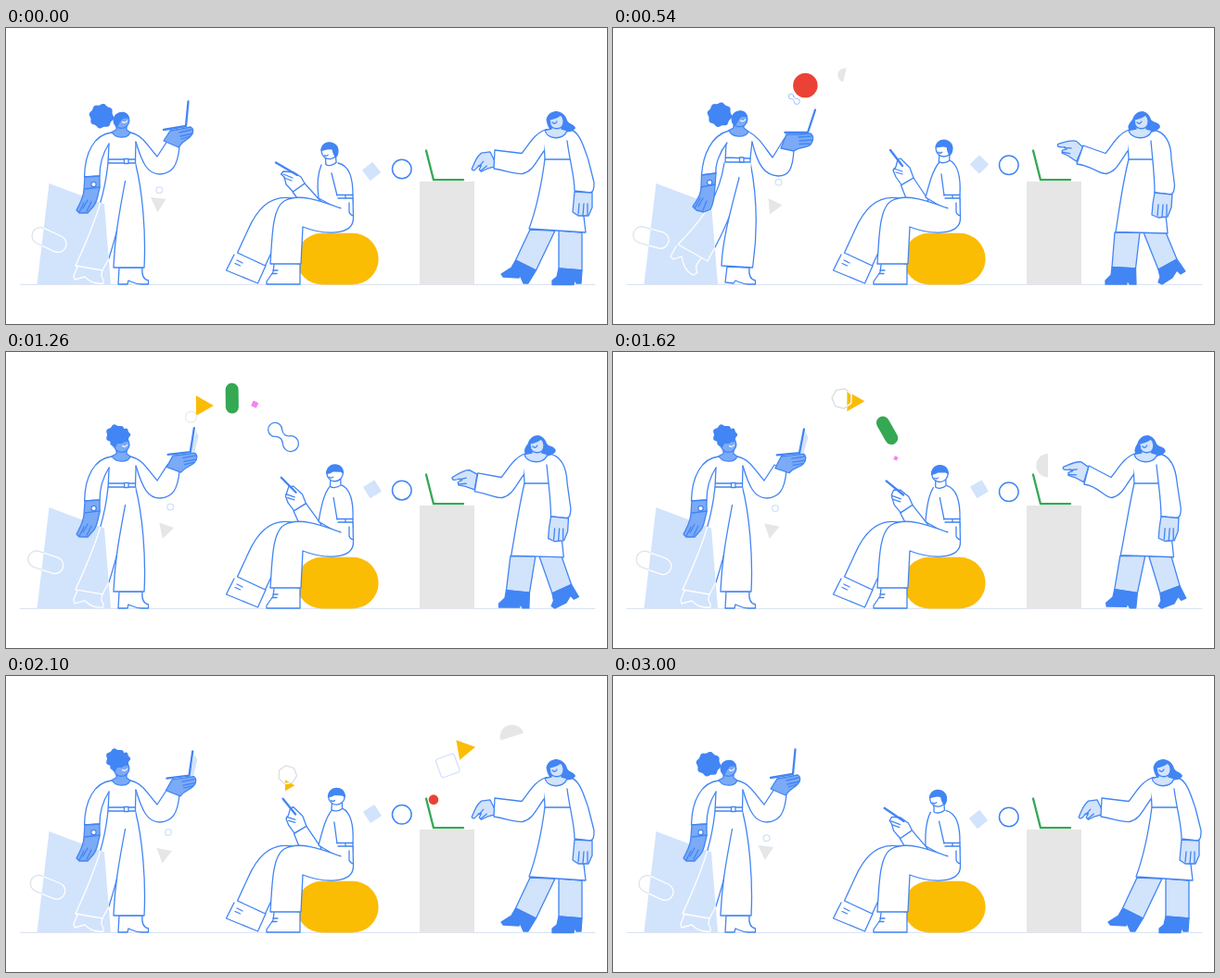
These frames come from a looping animation (648x320 px, 3.06 s). An HTML page:

```html
<!DOCTYPE html>
<html lang="en">
<head>
<meta charset="utf-8">
<title>People sharing shapes</title>
<style>
html, body { margin: 0; width: 100%; height: 100%; overflow: hidden; background: #fff; }
svg { display: block; }
</style>
</head>
<body>
<svg id="stage" width="648" height="320" viewBox="0 0 648 320" stroke-width="1.3" stroke-linejoin="round" stroke-linecap="round" fill="none"></svg>
<script>
const LOOP = 3060;
const BLUE = '#4285f4', SKIN = '#7baaf7', PALE = '#d2e3fc', GRAY = '#e6e6e6';
const RED = '#ea4335', GREEN = '#34a853', YELLOW = '#fbbc04', PINK = '#f583f5';
const line = { stroke: BLUE };
const cloth = { stroke: BLUE, fill: '#fff' };
const skin = { stroke: BLUE, fill: SKIN };
const pale = { stroke: BLUE, fill: PALE };
const ink = { fill: BLUE };
const bold = { stroke: BLUE, 'stroke-width': 2.3 };
const white = { stroke: '#fff' };

const stage = document.getElementById('stage');
function add(tag, attrs, parent = stage) {
  const node = document.createElementNS('http://www.w3.org/2000/svg', tag);
  for (const name in attrs) node.setAttribute(name, attrs[name]);
  parent.appendChild(node);
  return node;
}
const path = (style, d, parent) => add('path', { ...style, d }, parent);
const lerp = (a, b, k) => a + (b - a) * k;
const place = (node, x, y, angle = 0, scale = 1) =>
  node.setAttribute('transform', `translate(${x} ${y}) rotate(${angle}) scale(${scale})`);

// Blend two paths that have the same commands.
const NUMBER = /-?\d+(\.\d+)?/g;
function blend(a, b, k) {
  const ends = b.match(NUMBER);
  let i = 0;
  return a.replace(NUMBER, n => lerp(+n, +ends[i++], k).toFixed(2));
}
const parts = [];
function posed(pose, style, a, b, parent) {
  const node = path(style, a, parent);
  parts.push({ node, pose, a, b });
  return node;
}

// Eased value through the key times, closing the loop on the first one.
const TIMES = [0, 540, 900, 1620, 2100, 2580, 3000, LOOP];
function track(t, ...values) {
  values.push(values[0]);
  let i = 0;
  while (t >= TIMES[i + 1]) i++;
  const x = (t - TIMES[i]) / (TIMES[i + 1] - TIMES[i]);
  return lerp(values[i], values[i + 1], x * x * (3 - 2 * x));
}

function ring(radius, bumps, depth) {
  let d = '';
  for (let i = 0; i < 72; i++) {
    const a = i * Math.PI / 36, r = radius + depth * Math.cos(a * bumps);
    d += `${i ? 'L' : 'M'}${(r * Math.cos(a)).toFixed(2)},${(r * Math.sin(a)).toFixed(2)}`;
  }
  return d + 'Z';
}
function polygon(n, r) {
  return 'M' + Array.from({ length: n }, (_, i) =>
    [r * Math.cos(i * 2 * Math.PI / n), r * Math.sin(i * 2 * Math.PI / n)].map(v => v.toFixed(2))).join('L') + 'Z';
}

// Scenery
const defs = add('defs');
const BOARD = 'M46.5,168 L106,190.5 L113,277 L33.5,277Z';
path({}, BOARD, add('clipPath', { id: 'board' }, defs));
path({ stroke: '#d5dff0', 'stroke-width': 1 }, 'M15,277.3H635');
add('rect', { x: 313, y: 221.8, width: 88.6, height: 55.6, rx: 27.8, fill: YELLOW });
add('rect', { x: 446, y: 166, width: 59, height: 111.5, fill: GRAY });
const hoop = add('circle', { r: 10.3, ...line, 'stroke-width': 1.5 });
path({ stroke: GREEN, 'stroke-width': 2.3 }, 'M453,132.5L461,164.2H493');
const diamond = add('rect', { x: -7.3, y: -7.3, width: 14.6, height: 14.6, rx: 1, fill: PALE });
const wedge = path({ fill: GRAY }, 'M-6,-8.5L9,-1L-4.5,9Z');
const bead = add('circle', { r: 3.4, stroke: PALE });

// Left person
const backLeg = ['M110,146 C107,175 101,200 75,257 L104,262 L111,249 C121,217 128,190 129,163',
  'M120,146 C115,178 103,200 70,234 L102,252 L110,237 C127,205 133,185 137,158'];
const backBoot = ['M77,258 L73,268 L74,272 L85,269 C92,276 98,277 105,276 L105,272 C102,269 103,266 104,262',
  'M68,236 L62,247 L65,250 L74,247 C76,258 80,265 87,267 L91,264 C88,258 90,255 95,249'];
const pillSize = { x: -19.5, y: -9, width: 39, height: 18, rx: 9 };
const pills = [add('rect', { ...pillSize, stroke: '#dde3ec' })];
posed('left', line, ...backLeg);
path({ fill: PALE }, BOARD);
const onBoard = add('g', { 'clip-path': 'url(#board)' });
pills.push(add('rect', { ...pillSize, ...white }, onBoard));
posed('left', white, ...backLeg, onBoard);
posed('left', white, ...backBoot, onBoard);
posed('left', cloth, 'M122,259 L121,277 L131,277 L132,273 C137,275 140,277 146,277 L153.5,277 L153.5,273 C149,272 146,268 147,259Z',
  'M123,258 L121,275 L130,276 L132,273 C137,275 140,277 146,277 L153.5,277 L153.5,273 C149,272 146,268 147,259Z');
posed('left', cloth, 'M129,163 C121,205 117,230 116,259 L149,259 C151,220 147,175 139.5,146',
  'M137,158 C126,200 118,230 117,257 L150.5,259 C157,215 154,175 148,145');
posed('left', { fill: '#fff' }, 'M114,112 L134,112 L140,124 L139,164 L128,165 L110.5,147 L111,124Z',
  'M125,111 L146,112 L150,124 L148,160 L137,162 L121,147 L122,124Z');
posed('left', line, 'M111,125 L110,146 L139.5,146 L139.5,142 L110.5,142', 'M122,124 L121,145 L148,145 L148,141 L121,140');
posed('left', line, 'M140,123 L139.5,142', 'M150,123 L148,141');
posed('left', cloth, 'M127.5,141.5 L132,141.5 L132,146.5 L127.5,146.5Z', 'M136.5,140 L141,140 L141,145 L136.5,145Z');
posed('left', cloth, 'M114,113 C95,115 85,135 84.5,161 L101,160 C101,150 104,136 111,125',
  'M125,111 C106,116 97,137 95.5,159 L111,157 C110,148 115,134 123,124');
posed('left', cloth, 'M134,113 C148,116 153,128 163,139 L174,122 L187,128 C185,150 179,157 166,158 C153,158 147,147 140,123',
  'M146,112 C158,118 164,130 172,140 L185,119 L195,131 C194,152 190,160 178,160 C163,159 156,148 150,123');
posed('left', skin, 'M85,161 L101,160 L101,173 C99,180 99,186 95,192 L88,200 L79,200 L76,197 C80,189 84,183 84,174Z',
  'M95.5,159 L111,157 L110,171 C109,180 110,187 105,196 L98,199 L90,197 L86,193 C91,185 95,180 95,172Z');
posed('left', line, 'M85,174 L101,172 M83,195 L88,186 M87,198 L92,188 M79,199 L84,189',
  'M95,172 L110,169 M92,193 L97,184 M97,197 L101,187 M88,195 L94,184');
const watch = add('circle', { r: 2.7, ...cloth });

const screenBack = posed('arm', { fill: PALE }, 'M199,83 L202,89 L199,106 L194,108Z', 'M218,90 L221,96 L214,113 L210,114Z');
posed('arm', bold, 'M170,110 L194,106 L196.5,79.5', 'M185.5,113 L210,113 L218,88.5');
posed('arm', skin, 'M170,122 L177,111 L189,109 L199,107 C203,109 202,114 199,117 C196,121 191,121 186,129Z',
  'M181,130 L187,115 L200,115 L213,114 C217,117 216,122 213,126 C209,130 202,128 195,133Z');
posed('arm', line, 'M187,113 L200,110 M188,117 L201,114 M189,120 L198,117',
  'M200,118 L214,117 M201,122 L215,121 M201,125.5 L212,125');
posed('left', skin, 'M119,106 L119,110 L114,112.5 C118,120 131,120 134,113 L130,110 L130,106',
  'M130,104 L130,108 L125,110.5 C128,119 143,119 146,112 L141,108 L141,104');

const leftHead = add('g');
const bun = path(ink, ring(12.7, 8, 0.8), leftHead);
place(bun, -21.5, -4.8, 10);
add('circle', { r: 8.4, ...skin }, leftHead);
const cap = path(ink, 'M-8,4C-10,-6 -3,-10 3,-9C7,-8 9,-4 8,-2C4,-3 1,-3 0,0C-2,2 -3,6 -5,7Z', leftHead);
const curls = add('g', {}, leftHead);
place(path(ink, ring(10.6, 7, 0.9), curls), -5.8, -10.5);
place(path(ink, ring(7, 6, 0.7), curls), 2, -10.5);
path(ink, 'M-13,-11L8,-9L7,-3L-4,-2L-7,4L-12,0Z', curls);
path({ ...white, 'stroke-width': 1.2 }, 'M1,1.5Q4,3.5 6,0.5', leftHead);

// Seated person
path(cloth, 'M246,245L237.5,262L271.5,276L280,257');
path(line, 'M249,251L255,254M247,254.5L252.5,257');
path(cloth, 'M308,184C285,180 271,195 261,218L249.5,243L279.5,257L292,230');
posed('mid', cloth, 'M322,168 L340,188 L336,200 L314,184 L309,177Z', 'M324,162 L340,186 L332,195 L316,184 L310.5,170Z');
posed('mid', cloth, 'M309.5,177 L302,169 L300,161 L296.5,158 L299,155 L310,156 L318,161 L322,168Z',
  'M311,169.5 L305,161 L302,154 L305,150 L307,142 L310,141 L320,151 L324,162Z');
posed('mid', line, 'M299,158 L309,162 M300,162 L308,165', 'M303,152 L312,155 M305,156 L312,158');
posed('mid', bold, 'M291,145.5 L314,159', 'M299,132 L312,149');
posed('mid', cloth, 'M340,148 C337,155 335,168 337,184 L357,195 L374,190 L374,181 C374,163 371,149 358,146',
  'M352,145 C345,153 342,165 337,183 L357,195 L374,190 L374,181 C375,163 373,148 363,143');
posed('mid', line, 'M351,157 L357,181', 'M354,158 L357,181');
path(cloth, 'M289,256L288,264L281,274V277H317V256');
path(line, 'M288,262H293M287,265.5H292');
path(cloth, 'M361,195C340,187 315,178 300,187C287,195 287,225 285,255H318L320,215C340,223 375,226 374.5,205L374,184H358');
path(line, 'M357,180.5H374M366,180.5V184M370,189V199Q371,202 374.5,203');
const midHead = add('g');
path(cloth, 'M-5,7L-5.5,14C-3,16.5 3,15.5 6,13V6', midHead);
add('circle', { r: 8.7, ...cloth }, midHead);
const sweep = path(ink, 'M-9.4,-1C-9,-7 -4,-10 0,-9.8C6,-9.5 10,-5 9.8,0C9.7,4 8,7 6,8C4,5 3,2 3,-1C-1,-3 -5,-1 -9.4,-1Z', midHead);
const fringe = path(ink, 'M-9.6,1C-9.5,-6 -5,-9.8 0,-9.8C6,-9.8 9.7,-6 9.7,1L6,-1L-2,-1.5L-5,0Z', midHead);
path(line, 'M-6,4Q-4,6 -2,4', midHead);

// Right person
posed('right', pale, 'M565,218 L549.5,251 L571.5,262 L592,219Z', 'M541,221 L538,258.5 L563.5,260 L568,221Z');
posed('right', pale, 'M596,219 L596,260 L621,262 L621,221Z', 'M572,221 L588,261 L608,250 L596,221Z');
posed('right', { ...ink, ...line }, 'M549.5,251 L545,259 L534,266 L536,269 L553,270 L554,267 L558,276 L563,276 L571.5,262Z',
  'M538,258.5 L537,267 L531,273 L531,277 L554,277 L554,272 L557,277 L564,277 L563.5,260Z');
posed('right', { ...ink, ...line }, 'M596,260 L594,269 L589,273 L589,277.5 L612,277.5 L613,272 L615,276 L620,276 L621,262Z',
  'M588,261 L590,269 L588,275 L592,277 L603,270 L608,262 L612,266 L617,263 L608,250Z');
posed('right', cloth, 'M581,142 C577,172 572,195 564,217 L625,221 C622,190 617,165 612,142Z',
  'M556,142 C549,170 546,195 542,220.5 L598,222 C596,195 590,165 586,142Z');
posed('right', { fill: '#fff' }, 'M583,109 L606,109 L608,125 L611,141 L582,141 L579,122Z', 'M556,110 L582,110 L584,125 L585,141 L557,141 L555,122Z');
posed('right', line, 'M580,122 L581,142', 'M555,122 L556,142');
posed('right', cloth, 'M606,109 C618,111 622,125 628,143 L634,167 C634,175 633,178 629,178 L613,176 C613,160 608,145 605,122',
  'M582,110 C596,112 602,125 602,142 L605.5,170 C605,177 604,180 600,180 L584,178 C584,160 582,145 580,122');
posed('right', pale, 'M613,177 L632,178 L632,194 L628,203 L617,203 L611,199 L612,188Z',
  'M584,178 L603,180 L602,194 L598,204 L588,205 L581,202 L582,190Z');
posed('right', line, 'M617,201 L618,190 M622,203 L623,190 M627,202 L627,190', 'M587,203 L588,191 M592,204 L593,191 M597,203 L597,191');
const hand = path(pale, 'M0,-9L-9,-12C-16,-11 -21,-5 -26,-1C-26,2 -23,2 -18,-1L-15,0L-19,3L-18,6L-11,6L0,8Z');
const knuckles = path(line, 'M-18,0L-11,-3M-18,5L-10,3');
const sleeve = path(cloth, '');
posed('right', ink, 'M582.5,99 C584,92 589,90 594,90 C600,91 604,95 605,100 C607,104 613,104 614,108 C612,113 606,112 602,113 L588,112 C585,108 583,104 582.5,99Z',
  'M560,99 C562,93 566,90 571,90 C576,91 579,95 580,99 C583,103 589,101 590,107 C587,112 581,113 577,113 L558,111 C553,108 556,104 560,99Z');
posed('right', pale, 'M588,105 L588,109 L581,110.5 C583,121 602,122 605,110.5 L599,109 L599,104',
  'M564,105 L564,109 L556,110.5 C558,121 578,122 581,110.5 L575,109 L575,104');
const rightFace = add('g');
path(pale, 'M-8,-1C-4,-2 2,-4 4,-6C8,-3 8,4 5,7C1,10 -5,9 -7,5Z', rightFace);
path(line, 'M-5,2Q-2,5 0,1', rightFace);

// Flying shapes
const fromLeft = { curve: [[190, 90], [205, 31], [300, 33], [306, 125]], grow: 4.4 };
const fromDesk = { curve: [[460, 147], [460, 91], [510, 50], [590, 60]], grow: 6.5 };
const flyers = [];
function flyer(route, style, d, start, span, angle = 0, spin = 0, under) {
  const nodes = [path(style, d)];
  if (under) {
    const inner = add('g', { 'clip-path': `url(#${under})` });
    nodes.push(path(white, d, inner));
  }
  flyers.push({ route, nodes, start, span, angle, spin });
  return nodes;
}
function clipWith(id, nodes, d) {
  nodes.push(path({}, d, add('clipPath', { id }, defs)));
}
const disc = r => `M${-r},0A${r},${r} 0 1 1 ${r},0A${r},${r} 0 1 1 ${-r},0Z`;
const box = (w, h, r) => `M${r - w},${-h}H${w - r}A${r},${r} 0 0 1 ${w},${r - h}V${h - r}A${r},${r} 0 0 1 ${w - r},${h}H${r - w}A${r},${r} 0 0 1 ${-w},${h - r}V${r - h}A${r},${r} 0 0 1 ${r - w},${-h}Z`;
const half = r => `M${r * 0.45},${-r}A${r},${r} 0 0 0 ${r * 0.45},${r}Z`;
const dart = 'M-8,-11L11,0L-8,11Z';
const peanut = 'M-6,-5A7.5,7.5 0 1 0 -6,5C-2,2 2,3 5,6A8.5,8.5 0 1 0 5,-6C2,-2 -2,-2 -6,-5Z';

flyer(fromLeft, { fill: GRAY }, half(7.6), 90, 960, 13);
clipWith('red', flyer(fromLeft, { fill: RED }, disc(15), 360, 900), disc(15));
flyer(fromLeft, line, peanut, 465, 925, 42, 0, 'red');
flyer(fromLeft, { fill: PINK }, box(3.1, 3.1, 0.3), 640, 1020, 25);
flyer(fromLeft, { fill: GREEN }, box(16.5, 7, 7), 825, 965, 124, -77);
clipWith('dart', flyer(fromLeft, { fill: YELLOW }, dart, 980, 1150), dart);
flyer(fromLeft, { stroke: '#dadce0' }, polygon(7, 11), 1125, 1050, 0, 60, 'dart');
flyer(fromDesk, { fill: GRAY }, half(13), 1508, 750, -17, 113);
flyer(fromDesk, { fill: YELLOW }, dart, 1720, 760, -10);
flyer(fromDesk, { stroke: PALE }, box(10.5, 10.5, 2.5), 1845, 760, -20);
flyer(fromDesk, { fill: RED }, disc(10), 2039, 762);
flyer(fromDesk, { fill: PINK }, disc(4), 2150, 760);

function along(curve, u) {
  const v = 1 - u, w = [v * v * v, 3 * v * v * u, 3 * v * u * u, u * u * u];
  return [0, 1].map(axis => curve.reduce((sum, p, i) => sum + p[axis] * w[i], 0));
}
const show = (node, visible) => node.setAttribute('visibility', visible ? 'visible' : 'hidden');

function draw(t) {
  const pose = {
    left: track(t, 0, 1, 0.02, 0, 0, 0, 0),
    arm: track(t, 0, 1, 0.15, 0.44, 0.22, 0.22, 0),
    mid: track(t, 0, 1, 1, 0.45, 0.95, 1, 0.2),
    right: track(t, 0, 1, 1, 0.76, 0, 0, 0)
  };
  for (const p of parts) p.node.setAttribute('d', blend(p.a, p.b, pose[p.pose]));

  const second = t >= 1200 && t < 2760;
  for (const node of [bun, cap, sweep]) show(node, !second);
  for (const node of [curls, fringe, screenBack]) show(node, second);

  place(leftHead, lerp(124.5, 136.5, pose.left), lerp(100, 98.5, pose.left));
  place(watch, lerp(94.5, 104.2, pose.left), lerp(169, 167, pose.left));
  place(midHead, lerp(348.8, 356.8, pose.mid), lerp(133, 130.3, pose.mid), lerp(-6, 0, pose.mid));
  place(rightFace, lerp(594, 570, pose.right), 100);

  const cuffX = track(t, 526, 503, 503, 510, 526, 526, 526);
  const cuffY = track(t, 142, 137, 149, 133, 142, 142, 142);
  const tilt = track(t, -26, 24, 2, 17, -26, -26, -26);
  for (const node of [hand, knuckles]) place(node, cuffX, cuffY, tilt);
  const shift = -25 * pose.right, lean = tilt > 0 ? tilt / 8 : 0;
  sleeve.setAttribute('d', `M${583 + shift},109.5 C${569 + shift},114 ${564 + shift},126 ${556 + shift},135.5
    L${cuffX + 1 + lean},${cuffY - 10} L${cuffX - lean},${cuffY + 10}
    C${cuffX + 14},${cuffY + 12} ${cuffX + 20},158 ${557 + shift},157.5 C${568 + shift},155 ${571 + shift},145 ${580 + shift},133`);

  const pillX = track(t, 46.5, 41, 41.5, 44, 45, 46.3, 46.5);
  for (const node of pills) place(node, pillX, 229 - (46.5 - pillX) * 0.45, 25 - (46.5 - pillX) * 1.8);
  place(hoop, 426.8, track(t, 152.5, 148.2, 148, 151.2, 149.8, 152, 152.5));
  place(diamond, track(t, 394, 395, 395, 395, 395, 394, 394), track(t, 155, 147.5, 148.5, 148.2, 149, 153.5, 155),
    track(t, 52, 45, 57, 60, 57, 50, 52));
  place(wedge, track(t, 164.5, 173.5, 173.5, 171, 170.5, 165.5, 165), track(t, 189, 192.5, 192.3, 192, 192.5, 189.5, 189),
    track(t, -20, 0, 0, -14, -16, -20, -20));
  place(bead, track(t, 165.3, 178.5, 179.5, 175, 175, 167, 165.5), track(t, 175.3, 166.8, 166, 169, 169, 174, 175.3));

  for (const f of flyers) {
    const u = (t - f.start) / f.span;
    const size = Math.max(0, Math.min(1, u * f.route.grow, (1.04 - u) / 0.12));
    const visible = u > 0 && u < 1;
    const [x, y] = along(f.route.curve, u);
    for (const node of f.nodes) {
      show(node, visible);
      place(node, x, y, f.angle + f.spin * u, size);
    }
  }
}

const begin = performance.now();
function tick() {
  draw((performance.now() - begin) % LOOP);
  requestAnimationFrame(tick);
}
tick();
</script>
</body>
</html>
```
